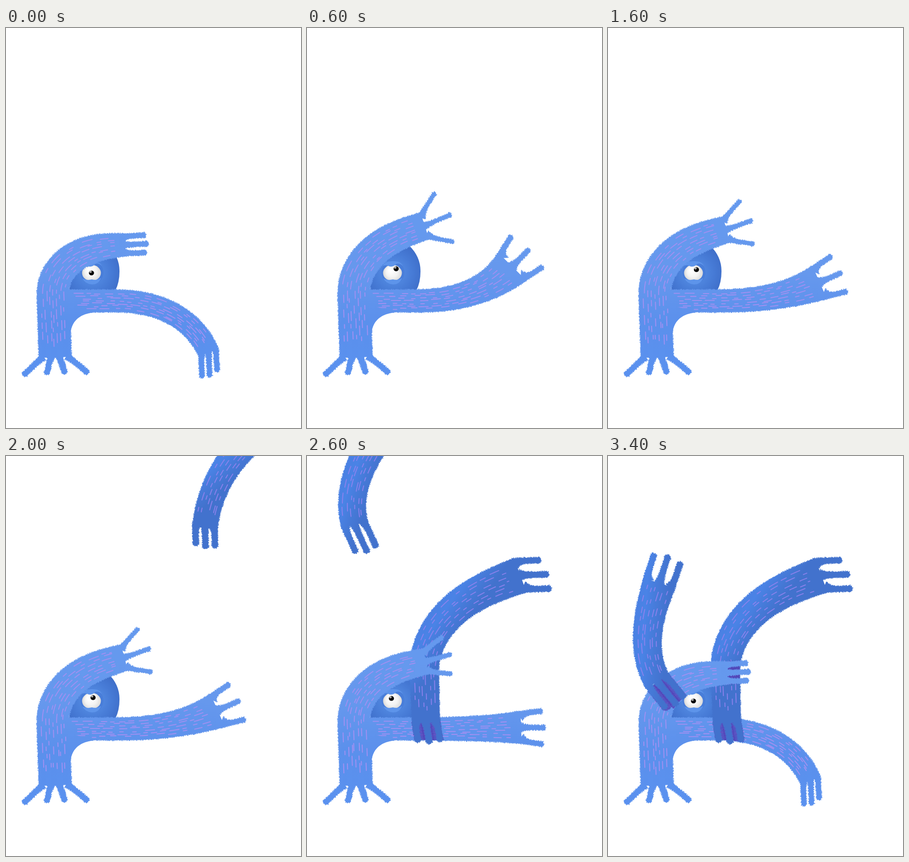
An HTML page with a canvas for the animation above (4.4 s loop, 642 by 872 pixels).

```html
<!DOCTYPE html>
<html lang="en">
<head>
<meta charset="utf-8">
<title>Furry creature</title>
<style>
html, body { margin: 0; width: 100%; height: 100%; overflow: hidden; background: #fff; }
canvas { display: block; }
</style>
</head>
<body>
<canvas id="stage" width="642" height="872"></canvas>
<script>
const ctx = document.getElementById('stage').getContext('2d');
const LOOP = 4400, DEG = Math.PI / 180;
const mix = (a, b, k) => a + (b - a) * k;
const easeOut = v => 1 - (1 - v) ** 1.8;
const easeIn = v => v ** 1.4;
const linear = v => v;

let seed = 1;
const rnd = () => (seed = seed * 16807 % 2147483647) / 2147483647;

// Adds to each x, y, r sample its unit direction (dx, dy) and right-hand normal (nx, ny).
function orient(points) {
  return points.map((p, i) => {
    const a = points[Math.max(0, i - 1)], b = points[Math.min(points.length - 1, i + 1)];
    const l = Math.hypot(b.x - a.x, b.y - a.y) || 1, dx = (b.x - a.x) / l, dy = (b.y - a.y) / l;
    return { ...p, dx, dy, nx: -dy, ny: dx };
  });
}
const reverse = s => ({ ...s, dx: -s.dx, dy: -s.dy, nx: -s.nx, ny: -s.ny });

// Walks a straight piece, then a bend whose heading eases from one angle to another.
function walk({ x, y, from, to, straight = 0, bend, ease, r, flare = 2 }) {
  const total = straight + bend, steps = Math.round(total / 4), step = total / steps, points = [];
  for (let i = 0; i <= steps; i++) {
    const u = i / steps;
    points.push({ x, y, r: mix(r[0], r[1], u ** flare) });
    const v = Math.max(0, Math.min(1, ((i + .5) * step - straight) / bend));
    const heading = mix(from, to, ease(v)) * DEG;
    x += Math.cos(heading) * step;
    y += Math.sin(heading) * step;
  }
  return orient(points);
}

// Splits the end of a limb into fingers that keep its outer edges and open with round webs.
function fingers(s, { count = 3, length, r, splay = 0, curl = 0, outer = -.1 }) {
  return Array.from({ length: count }, (_, i) => {
    const k = -1 + 2 * i / (count - 1), turn = (curl + k * splay) * DEG;
    const hx = s.dx * Math.cos(turn) + s.nx * Math.sin(turn);
    const hy = s.dy * Math.cos(turn) + s.ny * Math.sin(turn);
    const reach = length * (1 + outer * Math.abs(k)), points = [];
    for (let u = 0; u <= 1.01; u += .05) {
      const web = (s.r / count - r) * (1 - u) ** 5, side = k * (s.r - r - web), along = reach * u - 3;
      points.push({ x: s.x + s.nx * side + hx * along, y: s.y + s.ny * side + hy * along, r: r + web });
    }
    return orient(points);
  });
}

const across = (s, f) => [s.x + s.nx * s.r * f, s.y + s.ny * s.r * f];
function path(points) {
  const p = new Path2D();
  points.forEach(([x, y]) => p.lineTo(x, y));
  return p;
}

function fur(points) {
  ctx.lineWidth = 1.7;
  ctx.beginPath();
  for (let i = 1; i < points.length; i++) {
    const [x, y] = points[i - 1], dx = points[i][0] - x, dy = points[i][1] - y, l = Math.hypot(dx, dy);
    for (let d = rnd() * 2; d < l; d += 2.5) {
      const px = x + dx * d / l, py = y + dy * d / l, h = rnd() * 1.7, lean = (rnd() - .5) * 2;
      ctx.moveTo(px, py);
      ctx.lineTo(px + (dy * h + dx * lean) / l, py + (-dx * h + dy * lean) / l);
    }
  }
  ctx.stroke();
}

function ribbon(samples, color, round) {
  const edge = f => samples.map(s => across(s, f * (1 - 1 / s.r)));
  const left = edge(-1), right = edge(1).reverse(), tip = samples[samples.length - 1], cap = [];
  if (round) for (let a = .3; a < 3; a += .3) {
    const c = -Math.cos(a) * tip.r, d = Math.sin(a) * tip.r;
    cap.push([tip.x + tip.nx * c + tip.dx * d, tip.y + tip.ny * c + tip.dy * d]);
  }
  const shape = path([...left, ...cap, ...right]);
  ctx.fillStyle = ctx.strokeStyle = color;
  ctx.fill(shape);
  if (round) fur([...left, ...cap, ...right]);
  else { fur(left); fur(right); }
  return shape;
}
const drawHand = (s, hand, color) => fingers(s, hand).forEach(f => ribbon(f, color, true));

function hairs(samples, rows, color) {
  const last = Math.floor(samples.length * .93);
  ctx.strokeStyle = color;
  ctx.lineWidth = 2.1;
  for (let row = 0; row < rows; row++) {
    const f = mix(-.66, .66, row / (rows - 1));
    let i = Math.floor(samples.length * .07 + rnd() * 6);
    while (i < last) {
      const end = Math.min(last, i + 2 + Math.floor(rnd() * 4)), g = f + (rnd() - .5) * .16;
      ctx.stroke(path(samples.slice(i, end + 1).map(s => across(s, g))));
      i = end + 2 + Math.floor(rnd() * 4);
    }
  }
}

// Draws a limb with hands at its ends and returns its body shape.
function limb(samples, { startHand, endHand, color, rows, hair, start }) {
  seed = start;
  if (startHand) drawHand(reverse(samples[0]), startHand, color);
  if (endHand) drawHand(samples[samples.length - 1], endHand, color);
  const shape = ribbon(samples, color);
  hairs(samples, rows, hair);
  return shape;
}

function gripShadow(surface, s, hand) {
  ctx.save();
  ctx.clip(surface);
  drawHand(s, { ...hand, r: hand.r + 4 }, 'rgba(84,68,184,.8)');
  ctx.restore();
}

function gradient(g, ...colors) {
  colors.forEach((c, i) => g.addColorStop(i / (colors.length - 1), c));
  return g;
}
function backColor(samples) {
  const m = samples[samples.length >> 1];
  return gradient(ctx.createLinearGradient(...across(m, -1.1), ...across(m, 1.3)),
    '#4a80e2', '#4a83e6', '#467ad8', '#4272cd');
}
const frontColor = gradient(ctx.createLinearGradient(0, 430, 0, 750), '#6599ee', '#6698ed', '#5b90ec', '#5a91ef');
const headColor = gradient(ctx.createRadialGradient(187, 533, 20, 187, 533, 64), '#5188e0', '#477bd6', '#3f6fca');
const ballColor = gradient(ctx.createRadialGradient(182, 527, 4, 187, 534, 22), '#fff', '#f3f3f2', '#d3d3d3');
const headShape = new Path2D('M138 572V520Q190 460 222 474Q247 498 247 530Q247 555 238 572Z');
const armpit = new Path2D('M125 600L141 690Q132 626 192 620Z');
const lids = new Path2D('M165 519Q170 508 187 508Q204 508 209 519Q201 512 195 514Q185 524 176 518Q170 516 165 519Z' +
  'M166 546Q176 551 187 548Q198 551 207 545Q202 559 187 559Q172 558 166 546Z');

function oval(x, y, rx, ry, color) {
  ctx.fillStyle = color;
  ctx.beginPath();
  ctx.ellipse(x, y, rx, ry, 0, 0, 7);
  ctx.fill();
}

function drawHead(px, py) {
  ctx.fillStyle = headColor;
  ctx.fill(headShape);
  oval(187, 533, 25, 26, '#487dd9');
  oval(186, 534, 20.5, 17.5, ballColor);
  ctx.fillStyle = '#5d94ea';
  ctx.fill(lids);
  oval(px, py, 5.6, 5.3, '#080808');
  oval(px - 2, py - 2.6, 2.6, 2.4, '#a9a9a9');
}

// How far the arms are raised: up, waving, then down again.
function liftAt(t) {
  if (t < 600) return 1.14 * (t / 600) ** 1.2;
  if (t < 2600) return .92 + .22 * Math.cos((t - 600) / 800 * 2 * Math.PI);
  return Math.max(0, .7 * (3000 - t) / 400);
}
function glanceAt(t) {
  return t < 2400 ? -9 * Math.max(0, t - 1800) / 600 : -9 * Math.max(0, 3400 - t) / 1000;
}

function lowerArm(lift) {
  const swing = 68 - 100 * lift;
  return walk({ x: 120, y: 595, from: 0, to: swing, straight: 110, bend: 236 + .28 * Math.max(0, swing),
    ease: easeIn, r: [25, 36 - .18 * swing], flare: 4 });
}
const upperArm = lift => walk({ x: 107, y: 718, from: -92, to: -3 - 13 * lift, straight: 138,
  bend: 213 + 16 * lift, ease: easeOut, r: [36, 25 + 5 * lift], flare: 3 });
const rightLimb = holding => walk(holding
  ? { x: 259, y: 582, from: -92, to: -20, straight: 110, bend: 320, ease: easeOut, r: [31, 40], flare: 1.5 }
  : { x: 253, y: 466, from: -84, to: 0, bend: 435, ease: linear, r: [28, 42], flare: 1.5 });
const leftLimb = () => walk({ x: 108, y: 492, from: -120, to: -72, bend: 222, ease: easeOut, r: [30, 37] });

function draw(t) {
  const lift = liftAt(t), holding = t >= 2600;
  const front = { color: frontColor, hair: '#9f90f1', rows: 7 };
  const back = { hair: 'rgba(147,130,238,.85)', rows: 6 };
  ctx.clearRect(0, 0, 642, 872);
  ctx.lineCap = ctx.lineJoin = 'round';

  drawHead(186 + 7 * lift + glanceAt(t), 534 - 8 * lift);
  const arm = limb(lowerArm(lift), { ...front, start: 41,
    endHand: { length: 50, r: 6, splay: 10 * lift, curl: Math.max(0, 20 - 25 * lift) } });

  const upper = upperArm(lift), wrist = upper[upper.length - 1];
  const upperHand = { length: 47 + 12 * lift, r: 6 - lift, splay: 30 * lift, curl: -5 * lift };
  if (t >= 1800) {
    const right = rightLimb(holding), away = Math.max(0, 2400 - t) / 200;
    const grip = { length: 42, r: 7, curl: -8 };
    if (holding) gripShadow(arm, reverse(right[0]), grip);
    ctx.save();
    ctx.translate(90 * away, -155 * away);
    const body = limb(right, { ...back, start: 77, color: backColor(right), startHand: grip,
      endHand: { length: 58, r: 7, curl: holding ? 18 : 6 } });
    ctx.restore();
    if (t >= 3000) gripShadow(body, wrist, upperHand);
  }

  ctx.fillStyle = frontColor;
  ctx.fill(armpit);
  const trunk = limb(upper, { ...front, start: 23, endHand: upperHand,
    startHand: { count: 4, length: 26, r: 6.5, splay: 48, outer: 1 } });

  if (t >= 2200) {
    const left = leftLimb(), remaining = 3400 - Math.min(3400, t);
    const grip = { length: 63, r: 7, curl: -10 };
    if (!remaining) gripShadow(trunk, reverse(left[0]), grip);
    ctx.save();
    ctx.translate(95 - 16 * (remaining / 1000) ** 3, 510 - 204 * (remaining / 400) ** .76);
    ctx.rotate(18.5 * Math.sin(Math.PI * remaining / 1130) * DEG);
    ctx.translate(-95, -510);
    limb(left, { ...back, start: 58, color: backColor(left), startHand: grip, endHand: { length: 60, r: 7 } });
    ctx.restore();
  }
}

let shown = -1;
function tick(now) {
  const t = now % LOOP, beat = t < 600 || t >= 3200 ? 100 : 200;
  const step = Math.floor(t / beat) * beat;
  if (step !== shown) draw(shown = step);
  requestAnimationFrame(tick);
}
draw(0);
requestAnimationFrame(tick);
</script>
</body>
</html>
```
